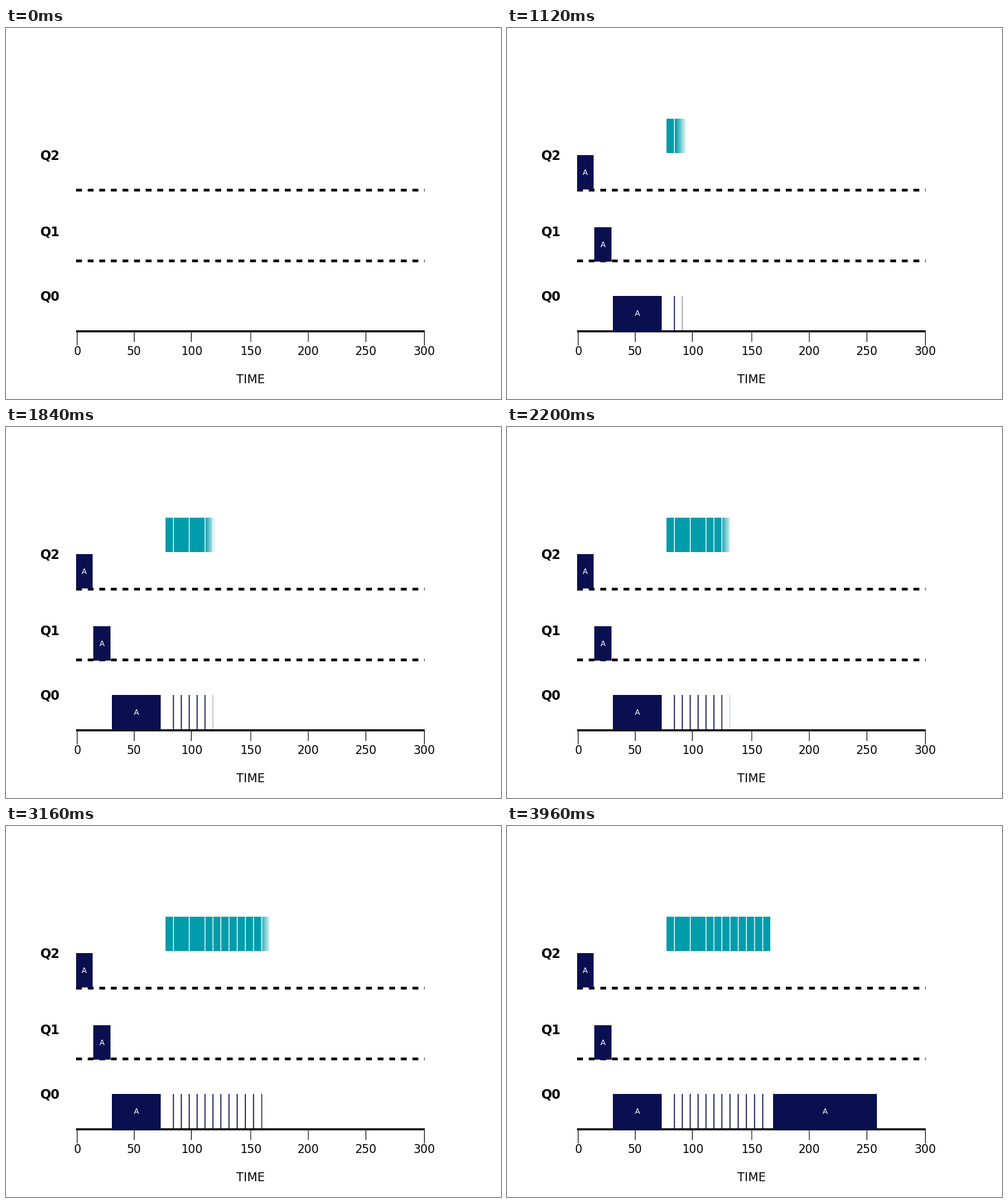
A matplotlib script that plays this animation: 720x540 px, repeating every 4.72 s.

```python
import numpy as np
import matplotlib.pyplot as plt
from matplotlib.animation import FuncAnimation
from matplotlib.colors import to_rgb

W, H = 720, 540
STEP, LOOP = 40, 4720
BLACK, NAVY, TEAL = "#000000", "#0a0f50", "#009cab"
SOFT, PAUSE = 16, 60  # wipe edge in px, rest between wipes in ms

fig = plt.figure(figsize=(W / 72, H / 72), dpi=72, facecolor="white")
ax = fig.add_axes([0, 0, 1, 1])
ax.axis("off")


def coverage(a, b, n):
    """Share of each of n pixels covered by the span a..b."""
    edge = np.arange(n)
    return np.clip(np.minimum(edge + 1, b) - np.maximum(edge, a), 0, 1)


def fill(layer, x0, y0, x1, y1, colour):
    cover = np.outer(coverage(y0, y1, H), coverage(x0, x1, W))
    layer[cover > 0, :3] = to_rgb(colour)
    layer[..., 3] = np.maximum(layer[..., 3], cover)


def show(layer, z):
    return ax.imshow(layer, extent=(0, W, H, 0), interpolation="nearest",
                     aspect="auto", zorder=z)


def label(x, y, text, size, **style):
    ax.text(x, y, text, fontsize=size, family="DejaVu Sans",
            ha="center", va="baseline", zorder=3, **style)


# Axis, ticks and dashed row lines
chart = np.zeros((H, W, 4))
fill(chart, 102, 440, 609, 443, BLACK)
for top in (234, 337):
    for x in 102 + 16.87 * np.arange(31):
        fill(chart, x, top, min(x + 8.44, 608.8), top + 4, BLACK)

tick_x = np.interp(range(7), [0, 2, 3, 5, 6], [103, 269, 355.5, 523, 608])
for i, x in enumerate(tick_x):
    fill(chart, x, 443, x + 1, 457 if 0 < i < 6 else 462, BLACK)
    label(x + 0.7, 475.7, str(50 * i), 16.7)
label(356, 517, "TIME", 17.3)
show(chart, 1)

# Task blocks: white labels on white stay hidden until the block appears
tasks = np.zeros((H, W, 4))
rows = (("Q2", 191.5, 185, 235, [(102, 126)]),
        ("Q1", 302.5, 290, 340, [(127, 152)]),
        ("Q0", 396.5, 390, 441, [(154, 225), (387, 538)]))
for name, base, top, bottom, spans in rows:
    label(63.2, base, name, 18.6, weight="bold")
    for x0, x1 in spans:
        fill(tasks, x0, top, x1, bottom, NAVY)
        label((x0 + x1) / 2, top + 29.2, "A", 11, color="white")

# Thin slices below, with the longer pieces between them above
slices = np.interp(range(12), [0, 6, 11], [243.5, 312.5, 372])
for x in slices:
    fill(tasks, x - 0.75, 390, x + 0.75, 440, NAVY)
cuts = [231.4, *np.delete(slices, [1, 3]), 383.6]
for left, right in zip(cuts, cuts[1:]):
    fill(tasks, left + 0.6, 132, right - 0.6, 182, TEAL)

# Soft wipes, one after the other: left, right, duration
wipes = ((102, 225, 577), (232, 383, 2745), (387, 538, 484))
columns = np.arange(W) + 0.5


def reveal(t):
    mask = np.zeros(W)
    start = 0
    for left, right, span in wipes:
        p = np.clip((t - start) / span, 0, 1)
        lead = left + p * (right - left + SOFT)
        inside = (columns > left - 2) & (columns < right + 2)
        mask[inside] = np.clip((lead - columns[inside]) / SOFT, 0, 1)
        start += span + PAUSE
    return mask


blocks = show(np.zeros_like(tasks), 2)
ax.set_xlim(0, W)
ax.set_ylim(H, 0)


def update(i):
    view = tasks.copy()
    view[..., 3] *= reveal(i * STEP)
    blocks.set_data(view)
    return (blocks,)


anim = FuncAnimation(fig, update, frames=LOOP // STEP, interval=STEP,
                     init_func=lambda: update(0), repeat=True, repeat_delay=0)
plt.show()
```
